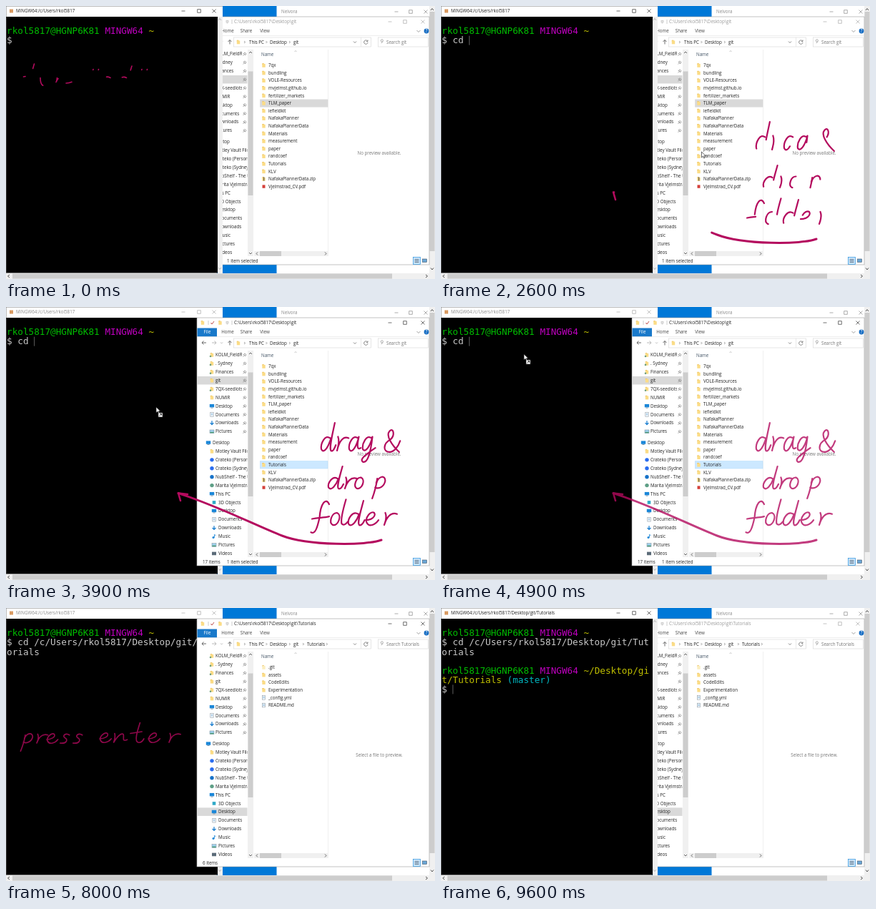
An HTML page for the animation above (9.7 s loop, 600 px wide and 382 px high).

```html
<!DOCTYPE html>
<html lang="en">
<head>
<meta charset="utf-8">
<title>Drag a folder into the terminal</title>
<style>
  html, body { margin: 0; width: 100%; height: 100%; overflow: hidden; background: #fff; }
  svg { display: block; width: 600px; height: 382px; }
  text { font: 6.2px "Open Sans", "Noto Sans", sans-serif; fill: #222; white-space: pre; }
  .term text { font: 12.68px "DejaVu Sans Mono", monospace; }
  .term .title { font: 6.2px "Open Sans", "Noto Sans", sans-serif; }
  .ink path { fill: none; stroke: #b40b5e; stroke-linecap: round; stroke-linejoin: round; stroke-dasharray: 1 2; }
</style>
</head>
<body>
<svg id="stage" viewBox="0 0 600 382"></svg>
<script>
const LOOP = 9700, STEP = 100;
const USER = 'rkol5817', HOST = 'HGNP6K81';
const stage = document.getElementById('stage');

function el(tag, attrs, parent = stage) {
  const node = document.createElementNS('http://www.w3.org/2000/svg', tag);
  for (const k in attrs) node.setAttribute(k, attrs[k]);
  return parent.appendChild(node);
}
const group = (parent, cls = '') => el('g', { class: cls }, parent);
const rect = (p, x, y, width, height, fill, extra) => el('rect', { x, y, width, height, fill, ...extra }, p);
const dot = (p, cx, cy, r, fill) => el('circle', { cx, cy, r, fill }, p);
const line = (p, d, stroke = '#444', width = 0.7) =>
  el('path', { d, stroke, fill: 'none', 'stroke-width': width }, p);
function label(p, x, y, str, fill = '#222', extra) {
  const node = el('text', { x, y: y + 2.1, ...extra }, p);
  node.style.fill = fill;
  node.textContent = str;
  return node;
}
const show = (node, on) => { node.style.display = on ? '' : 'none'; };

function clip(id, x, y, w, h) {
  rect(el('clipPath', { id }), x, y, w, h, '#000');
  return `url(#${id})`;
}
function buttons(p, xs, y, color) {
  const [a, b, c] = xs;
  return line(p, `M${a - 2.5} ${y}h5M${b - 2.3} ${y - 2.3}h4.6v4.6h-4.6zM${c - 2.5} ${y - 2.5}l5 5m0 -5l-5 5`, color);
}
function icon(p, kind, x, y) {
  if (kind === 'folder' || kind === 'zip' || kind === 'pale') {
    rect(p, x - 2.2, y - 2.8, 2.6, 2, '#edc35f');
    rect(p, x - 2.2, y - 2, 4.4, 4.8, kind === 'pale' ? '#fbeec0' : '#fbdc86');
    if (kind === 'zip') rect(p, x - 0.6, y - 2.6, 1.4, 5.2, '#6b6350');
  } else if (kind === 'pdf') rect(p, x - 2, y - 2.2, 4, 4.4, '#d4403a');
  else if (kind === 'screen') {
    rect(p, x - 3.2, y - 2.6, 6.4, 4.4, '#1b87d8');
    rect(p, x - 1.6, y + 2.2, 3.2, 0.8, '#5c7d98');
  } else if (kind === 'sheet') {
    rect(p, x - 2.2, y - 2.8, 4.4, 5.6, '#fff', { stroke: '#8a99a6', 'stroke-width': 0.6 });
    line(p, `M${x - 1.2} ${y - 1}h2.4m-2.4 1.6h2.4`, '#3d8cc8', 0.6);
  } else if (kind === 'down') line(p, `M${x} ${y - 3}v5m-2.4 -2.2l2.4 2.4l2.4 -2.4`, '#1b7fd0', 1.3);
  else if (kind === 'photo') {
    rect(p, x - 3, y - 2.3, 6, 4.6, '#9fd0ee', { stroke: '#7c8c96', 'stroke-width': 0.5 });
    rect(p, x - 2.6, y + 0.6, 5.2, 1.4, '#4c9a72');
  } else if (kind === 'note') {
    dot(p, x - 1, y + 1.4, 1.5, '#1b87d8');
    line(p, `M${x + 0.4} ${y + 1.4}v-4l2 1`, '#1b87d8', 0.9);
  } else if (kind === 'cube') rect(p, x - 2.3, y - 2.3, 4.6, 4.6, '#2fa9c7');
  else if (kind === 'film') rect(p, x - 3, y - 2.3, 6, 4.6, '#5b6b78');
  else dot(p, x, y, 2.7, kind);
}

// Desktop and outer scroll bars
rect(stage, 0, 0, 600, 382, '#fff');
rect(stage, 295, 0, 83.5, 374, '#0078d7');
label(stage, 385, 8, 'Nelvora', '#888');
buttons(stage, [546, 566, 587], 8, '#888');
rect(stage, 592, 0, 8, 374, '#f0f0f0');
rect(stage, 592.5, 8, 7, 335, '#cdcdcd');
line(stage, 'M594 366.5l2 2.5l2 -2.5M594 6l2 -2.5l2 2.5', '#555', 1);
rect(stage, 0, 374, 600, 8, '#f0f0f0');
rect(stage, 9, 374.5, 531, 7, '#cdcdcd');
line(stage, 'M5 376l-2.5 2l2.5 2M587 376l2.5 2l-2.5 2', '#555', 1);

const windows = group(stage);
const term = group(windows, 'term');
const files = group(windows);

// Terminal
rect(term, 0, 0, 303, 15, '#fff');
rect(term, 0, 15, 296, 358.5, '#000');
rect(term, 296, 15, 7, 359, '#f0f0f0');
line(term, 'M297 20l2 -2.5l2 2.5M297 366l2 2.5l2 -2.5', '#b0b0b0', 0.9);
line(term, 'M0 .3H303M.3 0V374', '#777', 0.6);
rect(term, 5, 4.5, 5, 5, '#d99a62');
const termTitle = label(term, 14, 7, '', '#222', { class: 'title' });
const termButtons = buttons(term, [248, 270, 291], 7);

const CHAR = 7.634;
const rowY = n => 35 + n * 13.15;
function cells(row, col, str, color, parent = term) {
  return label(parent, 1 + col * CHAR, rowY(row) + 2.2, str, color);
}
function prompt(row, parent) {
  cells(row, 0, `${USER}@${HOST}`, '#00bd00', parent);
  cells(row, 18, 'MINGW64', '#bf00bf', parent);
}
prompt(0, term);
cells(0, 26, '~', '#bfbf00');
const command = cells(1, 0, '', '#c8c8c8');
const wrapped = cells(2, 0, 'orials', '#c8c8c8');
const output = group(term);
prompt(4, output);
cells(4, 26, '~/Desktop/gi', '#bfbf00', output);
cells(5, 0, 't/Tutorials', '#bfbf00', output);
cells(5, 12, '(master)', '#00b5bf', output);
cells(6, 0, '$', '#c8c8c8', output);
const caret = rect(term, 0, 0, 0.9, 13, '#666');

// File window
rect(files, 267, 15, 325, 347, '#fff', { stroke: '#9a9a9a', 'stroke-width': 0.6 });
icon(files, 'folder', 275, 22);
line(files, 'M283 19v6M316 19v6', '#aaa', 0.6);
line(files, 'M286.5 22l1.5 2l3 -4', '#c0504d', 1);
icon(files, 'folder', 299.5, 22);
line(files, 'M307.5 21h4m-3.5 1.5l1.5 1.5l1.5 -1.5', '#666', 0.6);
const pathTitle = label(files, 319, 22, '');
const fileButtons = buttons(files, [537, 558, 583], 22);
rect(files, 267.5, 29.5, 27.5, 12, '#1979ca');
['File', 'Home', 'Share', 'View'].forEach((s, i) =>
  label(files, [281.5, 310, 336, 362][i], 35, s, i ? '#444' : '#fff', { 'text-anchor': 'middle' }));
line(files, 'M574.5 34l2.5 2.5l2.5 -2.5', '#777');
dot(files, 588, 35, 3.4, '#1a6fc4');
label(files, 588, 35, '?', '#fff', { 'text-anchor': 'middle' });
line(files, 'M267.5 41.5H592', '#e2e2e2', 0.6);
line(files, 'M280 50h-6m2.5 -2.5l-2.5 2.5l2.5 2.5M313 53.5v-6m-2.5 2.5l2.5 -2.5l2.5 2.5', '#444', 0.8);
line(files, 'M288 50h6m-2.5 -2.5l2.5 2.5l-2.5 2.5M300 49.5l1.5 1.5l1.5 -1.5', '#aaa', 0.8);
rect(files, 318.5, 44, 192, 13, '#fff', { stroke: '#d5d5d5', 'stroke-width': 0.6 });
rect(files, 520.5, 44, 70, 13, '#fff', { stroke: '#d5d5d5', 'stroke-width': 0.6 });
icon(files, 'folder', 325, 50.5);
const crumb = (p, x) => line(p, `M${x} 49l1.5 1.5l-1.5 1.5`, '#555', 0.6);
[333, 363.5, 396].forEach(x => crumb(files, x));
label(files, 340, 50.5, 'This PC');
label(files, 369, 50.5, 'Desktop');
label(files, 402, 50.5, 'git');
line(files, 'M486 49.5l2 2l2 -2M505.5 49a2.7 2.7 0 1 0 .5 2M506 47.5v2h-2', '#555');
line(files, 'M496.5 44v13', '#ddd', 0.6);
line(files, 'M527 49.5a1.6 1.6 0 1 0 -.1 .1l-2 2.5', '#777', 0.6);
const search = label(files, 532, 50.5, '', '#777');

// Navigation tree
const gitRow = rect(files, 267.5, 97, 70, 11.5, '#d9d9d9');
const deskRow = rect(files, 267.5, 279.4, 70, 11.5, '#d9d9d9');
const tree = el('g', { 'clip-path': clip('treeClip', 267, 60, 70.5, 290) }, files);
const pinned = el('g', { 'clip-path': clip('pinClip', 267, 60, 63, 290) }, tree);
const navY = i => 67 + i * 11.92;
[['folder', 'KOLM_FieldR'], ['folder', '. Sydney'], ['folder', 'Finances'], ['folder', 'git'],
 ['folder', '7QX-seedlots'], ['folder', 'NUMIR'], ['screen', 'Desktop'], ['sheet', 'Documents'],
 ['down', 'Downloads'], ['photo', 'Pictures']].forEach(([kind, name], i) => {
  const y = navY(i);
  icon(pinned, kind, 288, y);
  if (i < 3 || i === 4) dot(pinned, 286, y + 2, 1.3, '#6f9f7d');
  label(pinned, 293, y, name);
  line(tree, `M331.5 ${y + 2.5}l2 -2m-1.5 -1.5l3 3m-1 -4l2 2l-1.5 1.5l-2 -2z`, '#777', 0.7);
});
[['screen', 'Desktop', 0], ['folder', 'Motley Vault Files', 1], ['#2a6df0', 'Crateko (Personal)', 1],
 ['#2a6df0', 'Crateko (Sydney)', 1], ['#1672c9', 'NubShelf - The Uni', 1], ['#5d9f86', 'Marita Vjelmstrad', 1],
 ['screen', 'This PC', 1], ['cube', '3D Objects', 2], ['screen', 'Desktop', 2], ['sheet', 'Documents', 2],
 ['down', 'Downloads', 2], ['note', 'Music', 2], ['photo', 'Pictures', 2], ['film', 'Videos', 2]].forEach(([kind, name, depth], i) => {
  const y = 190 + i * 11.92;
  icon(tree, kind, [283, 288, 291][depth], y);
  label(tree, [289, 293, 297][depth], y, name);
});
rect(files, 338, 61, 8, 289, '#f0f0f0');
rect(files, 338.5, 91.5, 7, 173.5, '#cdcdcd');
line(files, 'M340 66l2 -2l2 2M340 345l2 2l2 -2', '#555', 0.9);

// File list
label(files, 357, 68, 'Name', '#456');
line(files, 'M403.5 64l1.5 -1.5l1.5 1.5', '#888', 0.5);
rect(files, 347, 343, 103, 7, '#f0f0f0');
rect(files, 355, 343, 30, 7, '#cdcdcd');
line(files, 'M352 344.5l-2 2l2 2M446 344.5l2 2l-2 2', '#555', 0.9);
line(files, 'M450.5 61V350', '#ececec', 0.8);

const listY = i => 83 + i * 10.6;
function listing(names, kindOf, message) {
  const g = group(files);
  const mark = rect(g, 355.5, 0, 94.5, 10.3, '#d9d9d9', { 'stroke-width': 0.6 });
  names.forEach((name, i) => {
    icon(g, kindOf(name), 360.5, listY(i));
    label(g, 367, listY(i), name);
  });
  label(g, 522, 206, message, '#777', { 'text-anchor': 'middle' });
  return { g, mark };
}
const parentDir = listing(
  ['7qx', 'bundling', 'VOLE-Resources', 'mvjelmst.github.io', 'fertilizer_markets', 'TLM_paper', 'iefieldkit',
   'NafakaPlanner', 'NafakaPlannerData', 'Materials', 'measurement', 'paper', 'randcoef', 'Tutorials', 'KLV',
   'NafakaPlannerData.zip', 'Vjelmstrad_CV.pdf'],
  n => n.endsWith('.zip') ? 'zip' : n.endsWith('.pdf') ? 'pdf' : 'folder', 'No preview available.');
const childDir = listing(
  ['.git', 'assets', 'CodeEdits', 'Experimentation', '_config.yml', 'README.md'],
  n => n === '.git' ? 'pale' : /yml|md/.test(n) ? 'sheet' : 'folder', 'Select a file to preview.');
show(childDir.mark, false);
label(parentDir.g, 309, 357, '1 item selected');
crumb(childDir.g, 415);
label(childDir.g, 421, 50.5, 'Tutorials');
const lastCrumb = crumb(childDir.g, 448);
const count = label(files, 275, 357, '');
rect(files, 569.5, 351.5, 10, 10, '#cce8ff', { stroke: '#2b8fd9', 'stroke-width': 0.7 });
line(files, 'M571.5 354.5h6m-6 2h6m-6 2h6', '#456', 0.8);
rect(files, 582.5, 354, 6, 4.5, '#6aa6d6', { stroke: '#456', 'stroke-width': 0.6 });

// Handwriting: baseline at 0, x-height 10
const GLYPHS = {
  t: ['M7 -22C4 -12 1 -1 5 0C8 1 10 -2 11 -4', 'M-3 -10L9 -12'],
  y: ['M0 -9C0 -2 3 0 6 -3C8 -5 9 -8 10 -11C9 -2 5 8 1 8C-2 7 3 3 8 0'],
  p: ['M3 -9C2 -2 0 4 -2 9', 'M2 -5C5 -12 11 -12 11 -7C10 -2 5 1 1 -1'],
  e: ['M0 -4C5 -4 10 -7 8 -10C5 -12 -1 -6 1 -2C3 2 9 0 12 -4'],
  c: ['M10 -9C6 -12 0 -7 0 -2C1 2 7 1 10 -3'],
  d: ['M9 -9C4 -12 -1 -5 0 -1C3 3 8 -4 10 -9', 'M14 -20C11 -10 8 -2 10 0C12 1 14 -2 15 -4'],
  '"': ['M0 -17L-1 -13', 'M5 -17L4 -13'],
  r: ['M1 -10C3 -6 1 -3 0 0C2 -6 6 -11 12 -9'],
  a: ['M9 -9C4 -12 -1 -5 0 -1C3 3 8 -4 10 -10C8 -4 8 0 12 -2'],
  g: ['M9 -9C4 -12 -1 -5 0 -1C3 2 8 -4 10 -10C8 2 5 9 0 8C-4 6 5 2 13 -2'],
  '&': ['M14 1C6 -4 0 -11 4 -14C8 -17 10 -11 5 -8C-3 -5 -3 1 4 1C9 1 13 -3 15 -7'],
  o: ['M6 -10C1 -10 -2 -2 2 0C7 1 11 -8 6 -10'],
  f: ['M14 -17C11 -23 6 -18 5 -6C3 2 1 8 -3 6', 'M-2 -5C4 -6 9 -6 14 -7'],
  l: ['M5 -21C2 -12 0 -4 1 -1C3 1 5 -1 7 -3'],
  s: ['M9 -9C5 -12 1 -8 4 -6C8 -4 6 1 -1 0'],
  n: ['M0 -10C1 -6 0 -3 -1 0C3 -7 7 -11 9 -9C10 -6 7 0 13 -3']
};
const stroke = (p, d, width) => el('path', { d, pathLength: 1, 'stroke-width': width }, p);
function write(p, word, xs, y, sx, sy, width) {
  [...word].forEach((ch, i) => GLYPHS[ch].forEach(d =>
    stroke(p, d.replace(/(-?\d+) (-?\d+)/g, (_, a, b) => `${xs[i] + a * sx} ${y + b * sy}`), width)));
}
const typeInk = group(stage, 'ink'), dragInk = group(stage, 'ink'), enterInk = group(stage, 'ink');
write(typeInk, 'type"cd"', [29, 48, 67, 84, 122, 131, 155, 190], 114, 1.5, 1.5, 1.6);
write(dragInk, 'drag&', [441, 463, 480, 499, 531], 201, 1.35, 1.95, 2.2);
write(dragInk, 'drop', [451, 474, 488, 515], 254, 1.4, 1.55, 2.2);
write(dragInk, 'folder', [431, 454, 468, 479, 503, 529], 305, 1.5, 1.7, 2.2);
stroke(dragInk, 'M525 326C505 334 422 334 386 320C350 306 300 280 241 260.500', 3);
stroke(dragInk, 'M244 271L241 260.500L254 262', 2.6);
write(enterInk, 'press', [23, 43, 57, 77, 95], 189, 1.3, 1.25, 1.7);
write(enterInk, 'enter', [131, 152, 178, 199, 228], 188, 1.35, 1.25, 1.7);

// Each ink: [group, write start, write end, fade start, fade end]
const INKS = [
  [typeInk, -100, 600, 2000, 2400],
  [dragInk, 2300, 2900, 4820, 5220],
  [enterInk, 5500, 6100, 7920, 8300]
];
const ramp = (t, a, b) => Math.min(1, Math.max(0, (t - a) / (b - a)));

// Pointers, hot spot at 0,0
const pointer = group(stage);
const outline = { fill: '#fff', stroke: '#222', 'stroke-width': 0.7 };
const arrow = el('path', { d: 'M0 0V8L2 6.3L3.4 9L4.7 8.4L3.4 5.8H6Z', ...outline }, pointer);
const hand = el('path', { d: 'M0 0Q1.3 -1 1.6 .5V4L5 5Q6 5.3 5.7 7L5 10H1L-2 6.5Q-2.5 5.2 -1 5.6L0 6.3Z', ...outline }, pointer);
const badge = group(pointer);
rect(badge, 3, 8, 6, 6, '#fff', { stroke: '#333', 'stroke-width': 0.6 });
line(badge, 'M4.5 12.5l3 -3m-2.3 0h2.3v2.3', '#222', 0.8);

const MOVES = [[1800, 297, 176], [1900, 297, 176], [2000, 344, 185], [2400, 350, 192], [2900, 386, 222],
  [3200, 386, 222], [3900, 210, 140], [4300, 210, 140], [4800, 116, 66], [5300, 116, 66]];
function pointerAt(t) {
  const i = Math.max(1, MOVES.findIndex(m => m[0] >= t));
  const [ta, xa, ya] = MOVES[i - 1], [tb, xb, yb] = MOVES[i], k = ramp(t, ta, tb);
  return [xa + (xb - xa) * k, ya + (yb - ya) * k];
}

// Caret: [from, to, column, row]
const CARET = [[300, 500, 3, 1], [500, 1000, 4, 1], [1100, 1600, 5, 1], [2100, 5300, 5, 1],
  [8500, 9300, 6, 2], [9300, 9600, 0, 3], [9600, 9700, 2, 6]];
const COMMAND = [[0, '$'], [300, '$ c'], [500, '$ cd'], [5300, `$ cd /c/Users/${USER}/Desktop/git/Tut`]];

let front = null;
function raise(win) {
  if (win !== front) windows.appendChild(front = win);
}
function draw(t) {
  const filesFront = t >= 3200 && t < 8500, termActive = t < 3000 || t >= 8500;
  const inside = t >= 6600, done = t >= 9600;
  raise(filesFront ? files : term);
  termTitle.textContent = `MINGW64:/c/Users/${USER}${done ? '/Desktop/git/Tutorials' : ''}`;
  termTitle.style.fill = termActive ? '#222' : '#8a8a8a';
  termButtons.setAttribute('stroke', termActive ? '#333' : '#aaa');
  pathTitle.textContent = `C:\\Users\\${USER}\\Desktop\\git${inside ? '\\Tutorials' : ''}`;
  pathTitle.style.fill = filesFront ? '#222' : '#999';
  fileButtons.setAttribute('stroke', filesFront ? '#333' : '#aaa');
  search.textContent = inside ? 'Search Tutorials' : 'Search git';
  count.textContent = inside ? '6 items' : '17 items';
  show(gitRow, !inside);
  show(deskRow, inside);
  show(parentDir.g, !inside);
  show(childDir.g, inside);
  show(lastCrumb, t >= 7000);
  const picked = t >= 3000;
  parentDir.mark.setAttribute('y', listY(picked ? 13 : 5) - 5.1);
  parentDir.mark.setAttribute('fill', picked ? '#cce8ff' : '#d9d9d9');
  parentDir.mark.setAttribute('stroke', picked ? '#b5dcfa' : '#d9d9d9');

  command.textContent = COMMAND.filter(c => c[0] <= t).pop()[1];
  show(wrapped, t >= 5300);
  show(output, done);
  const c = CARET.find(([a, b]) => t >= a && t < b);
  show(caret, c);
  if (c) {
    caret.setAttribute('x', 1 + c[2] * CHAR);
    caret.setAttribute('y', rowY(c[3]) - 6.5);
  }

  for (const [g, a, b, fadeA, fadeB] of INKS) {
    const p = ramp(t, a, b), alpha = 1 - ramp(t, fadeA, fadeB);
    show(g, p > 0 && alpha > 0);
    g.style.opacity = alpha;
    g.style.strokeDashoffset = 1 - p;
  }

  const visible = t >= 1800 && t < 5300;
  show(pointer, visible);
  if (visible) {
    pointer.setAttribute('transform', `translate(${pointerAt(t)})`);
    const pointing = t >= 2000 && t < 2500;
    show(hand, pointing);
    show(arrow, !pointing);
    show(badge, t >= 3300);
  }
}

const start = performance.now();
function tick() {
  const t = (performance.now() - start) % LOOP;
  draw(Math.floor(t / STEP) * STEP);
  requestAnimationFrame(tick);
}
tick();
</script>
</body>
</html>
```
